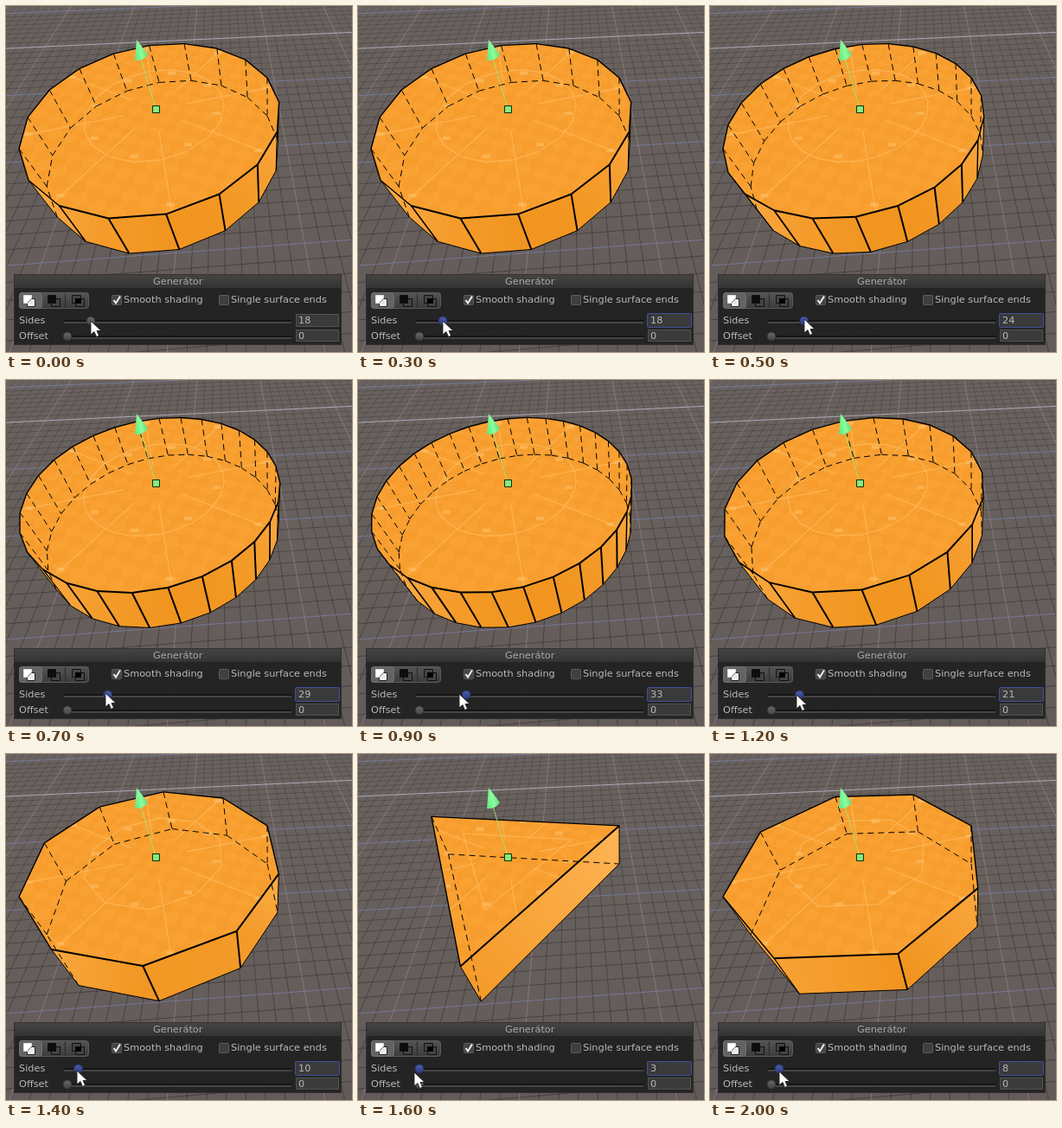
An HTML page with a canvas that plays this animation: 400x400 px, repeating every 2100 ms.

```html
<!DOCTYPE html>
<html>
<head>
<meta charset="utf-8">
<style>
  html, body { margin: 0; width: 100%; height: 100%; overflow: hidden; background: #665f5c; }
  canvas { display: block; }
</style>
</head>
<body>
<canvas id="stage" width="400" height="400"></canvas>
<script>
const stage = document.getElementById('stage');
const view = stage.getContext('2d');
const LOOP = 2100;

// start time, sides, cursor x, cursor y, dragging
const steps = [
  [0, 18, 98, 364, false],
  [300, 18, 98, 364, true],
  [500, 24, 109, 362, true],
  [700, 29, 115, 362, true],
  [900, 33, 117, 363, true],
  [1200, 21, 100, 364, true],
  [1400, 10, 82, 366, true],
  [1600, 3, 65, 368, true],
  [2000, 8, 80, 367, true]
];

// Perspective of the cylinder: unit disc (u, v), depth 0 = top, 1 = bottom
function project(u, v, depth = 0) {
  const w = 1 + 0.101 * u - 0.225 * v + 0.113 * depth;
  return [
    (159.5 * u - 4.5 * v + 173 + 34.2 * depth) / w,
    (-28.5 * u + 59.2 * v + 119.8 + 62.9 * depth) / w
  ];
}

function trace(c, points, close) {
  c.beginPath();
  for (const p of points) c.lineTo(...p);
  if (close) c.closePath();
}

function fillShape(c, points, color) {
  trace(c, points, true);
  c.fillStyle = color;
  c.fill();
}

function line(c, points, color, width = 1, close = false) {
  trace(c, points, close);
  c.strokeStyle = color;
  c.lineWidth = width;
  c.stroke();
}

function box(c, x, y, w, h, fill, border, radius = 0) {
  c.beginPath();
  c.roundRect(x + 0.5, y + 0.5, w - 1, h - 1, radius);
  c.fillStyle = fill;
  c.fill();
  c.strokeStyle = border;
  c.lineWidth = 1;
  c.stroke();
}

function text(c, string, x, y, color = '#b9b9b9') {
  c.font = '11.3px "DejaVu Sans", sans-serif';
  c.fillStyle = color;
  c.fillText(string, x, y);
}

function vertical(c, top, bottom, colors) {
  const g = c.createLinearGradient(0, top, 0, bottom);
  colors.forEach((color, i) => g.addColorStop(i / (colors.length - 1), color));
  return g;
}

function layer(draw) {
  const canvas = document.createElement('canvas');
  canvas.width = canvas.height = 400;
  draw(canvas.getContext('2d'));
  return canvas;
}

function drawGround(c) {
  c.fillStyle = vertical(c, 0, 400, ['#69625f', '#665f5c', '#635b59']);
  c.fillRect(0, 0, 400, 400);
  // i counts major lines
  const row = i => {
    const y = 1 / (0.002252 + i * 0.000476) - 263;
    return [[0, y], [400, y - 400 * (y + 373) / 9000]];
  };
  const column = i => [-266, 420].map(y => [244 + (106 + 155 * i) * (y + 266) / 566, y]);
  const minor = vertical(c, 0, 300, ['rgba(50,46,45,.3)', 'rgba(45,41,40,.55)']);
  const split = 8;
  for (let i = -2 * split; i <= 3 * split; i++) if (i % split) line(c, row(i / split), minor);
  for (let i = -5 * split; i <= 3 * split; i++) if (i % split) line(c, column(i / split), minor);
  for (let i = -4; i <= 3; i++) line(c, column(i), 'rgba(165,140,145,.55)');
  for (let i = -1; i <= 3; i++) line(c, row(i), i === 2 ? '#a9a9b6' : 'rgba(125,132,175,.7)');
}

function drawCheck(c, x, on) {
  box(c, x, 334, 12, 12, on ? '#444' : '#3f3f3f', '#5c5c5c', 1);
  if (on) line(c, [[x + 2.5, 340], [x + 5, 343.5], [x + 10, 335.5]], '#eee', 2);
}

function drawPanel(c) {
  c.fillStyle = 'rgba(33,33,33,.94)';
  c.fillRect(9, 310, 379, 82);
  c.fillStyle = vertical(c, 310, 326, ['#464544', '#343333']);
  c.fillRect(9, 310, 379, 16);
  c.strokeStyle = 'rgba(50,48,47,.9)';
  c.lineWidth = 1;
  c.strokeRect(9.5, 310.5, 378, 81);
  text(c, 'Generátor', 170, 322, '#aaa');

  box(c, 15, 331, 81, 19, vertical(c, 331, 350, ['#555', '#3b3b3b']), '#5a5a5a', 3);
  box(c, 15, 331, 27, 19, '#636363', '#707070', 3);
  line(c, [[68.5, 332], [68.5, 349]], '#2a2a2a');
  box(c, 24, 338, 10, 10, '#eee', '#222');
  box(c, 20, 334, 10, 10, '#fff', '#ddd');
  line(c, [[25, 343], [30, 338]], '#666');
  box(c, 52, 338, 11, 10, '#444', '#111');
  box(c, 48, 334, 10, 10, '#0d0d0d', '#111');
  box(c, 80, 338, 11, 10, '#444', '#111');
  box(c, 76, 334, 11, 10, '#444', '#111');
  box(c, 80, 338, 7, 6, '#000', '#000');

  drawCheck(c, 122, true);
  text(c, 'Smooth shading', 136, 343);
  drawCheck(c, 246, false);
  text(c, 'Single surface ends', 260, 343);
  text(c, 'Sides', 15, 367);
  text(c, 'Offset', 15, 385);
  for (const y of [364, 382]) {
    c.fillStyle = '#151515';
    c.fillRect(67, y - 1, 263, 2);
    c.fillStyle = '#454545';
    c.fillRect(67, y + 1, 263, 2);
  }
}

const ground = layer(drawGround);
const panel = layer(drawPanel);

function drawCapTexture(c, top, ring) {
  c.save();
  trace(c, top, true);
  c.clip();
  const cell = 0.1;
  for (let i = -10; i < 10; i++) {
    for (let j = -10; j < 10; j++) {
      if ((i + j) % 2) continue;
      const corners = [[0, 0], [1, 0], [1, 1], [0, 1]];
      fillShape(c, corners.map(([a, b]) => project((i + a) * cell, (j + b) * cell)), 'rgba(215,120,10,.12)');
    }
  }
  const pale = 'rgba(255,200,115,.5)';
  const blob = ([x, y]) => {
    c.fillStyle = pale;
    c.fillRect(x - 5, y - 2, 9, 4);
  };
  line(c, ring(0.55, 0), pale, 1.3, true);
  for (let k = 0; k < 8; k++) {
    const at = (r, turn) => {
      const a = (k + turn) * Math.PI / 4 + 0.14;
      return project(r * Math.cos(a), r * Math.sin(a));
    };
    line(c, [at(0.25, 0), at(1, 0)], pale, 1.3);
    blob(at(0.5, 0.5));
    blob(at(0.94, 0));
  }
  c.restore();
}

function sideColor(angle) {
  const t = Math.sin(angle - 1.65) ** 2;
  return `rgb(${241 + 14 * t},${149 + 31 * t},${32 + 53 * t})`;
}

function drawCylinder(c, n) {
  const angle = k => k * 2 * Math.PI / n;
  const ring = (r, depth) => Array.from({ length: n }, (_, k) =>
    project(r * Math.cos(angle(k)), r * Math.sin(angle(k)), depth));
  const top = ring(1, 0), bottom = ring(1, 1);
  // sine between a face's screen edges: above 0 faces the viewer, near 0 is a sliver
  const facing = top.map((p, k) => {
    const q = top[(k + 1) % n], d = bottom[k];
    const ex = q[0] - p[0], ey = q[1] - p[1], dx = d[0] - p[0], dy = d[1] - p[1];
    return (ey * dx - ex * dy) / Math.hypot(ex, ey) / Math.hypot(dx, dy);
  });

  fillShape(c, top, '#faa133');
  drawCapTexture(c, top, ring);
  top.forEach((p, k) => {
    if (facing[k] <= 0) return;
    const next = (k + 1) % n;
    const g = c.createLinearGradient(...p, ...top[next]);
    g.addColorStop(0, sideColor(angle(k)));
    g.addColorStop(1, sideColor(angle(k + 1)));
    fillShape(c, [p, top[next], bottom[next], bottom[k]], g);
  });

  const edge = (from, to, width, hidden) => {
    c.setLineDash(hidden ? [7, 5] : []);
    line(c, [from, to], '#000', width);
  };
  const weight = f => 1 + Math.min(1, Math.max(0, 2 * f));
  top.forEach((p, k) => {
    const next = (k + 1) % n;
    const before = facing[(k + n - 1) % n], after = facing[k];
    edge(p, bottom[k], weight(Math.min(before, after)), before <= 0 && after <= 0);
    edge(bottom[k], bottom[next], 1, after <= 0);
    edge(p, top[next], Math.max(1.4, weight(after)), false);
  });
  c.setLineDash([]);
}

function drawGizmo(c) {
  line(c, [[173, 119], [156, 60]], 'rgba(150,240,110,.85)');
  const g = c.createLinearGradient(148, 54, 164, 50);
  g.addColorStop(0, '#66e880');
  g.addColorStop(0.5, '#8cff9e');
  g.addColorStop(1, '#58d070');
  c.beginPath();
  c.moveTo(151, 39);
  c.lineTo(164, 56);
  c.quadraticCurveTo(159, 64, 149, 63);
  c.closePath();
  c.fillStyle = g;
  c.fill();
  box(c, 169, 115, 9, 9, '#83ef79', '#102a10');
}

function drawKnob(c, x, y, active) {
  c.beginPath();
  c.arc(x, y, 5, 0, 7);
  c.fillStyle = vertical(c, y - 5, y + 5, active ? ['#4c5fae', '#2c3a7c'] : ['#686868', '#434343']);
  c.fill();
  c.strokeStyle = active ? '#263062' : '#303030';
  c.lineWidth = 1;
  c.stroke();
}

function drawCursor(c, x, y) {
  const arrow = [[0, 0], [0, 16], [4, 12.5], [6.5, 18.5], [9.5, 17], [7, 11.5], [12, 11.5]]
    .map(([dx, dy]) => [x + dx, y + dy]);
  fillShape(c, arrow, '#fff');
  line(c, arrow, '#222', 0.9, true);
}

function render(time) {
  const [, sides, x, y, active] = steps.findLast(step => step[0] <= time);
  view.drawImage(ground, 0, 0);
  drawCylinder(view, sides);
  drawGizmo(view);
  view.drawImage(panel, 0, 0);
  if (active) box(view, 334, 355, 52, 17, '#3a3a3a', '#3f4f9c', 1);
  else box(view, 335, 356, 50, 15, '#3a3a3a', '#525252');
  box(view, 335, 374, 50, 14, '#3a3a3a', '#525252');
  text(view, String(sides), 338, 367);
  text(view, '0', 338, 385);
  drawKnob(view, 71 + (sides - 3) * 1.8, 364, active);
  drawKnob(view, 71, 382, false);
  drawCursor(view, x, y);
}

function frame() {
  render(performance.now() % LOOP);
  requestAnimationFrame(frame);
}
frame();
</script>
</body>
</html>
```
